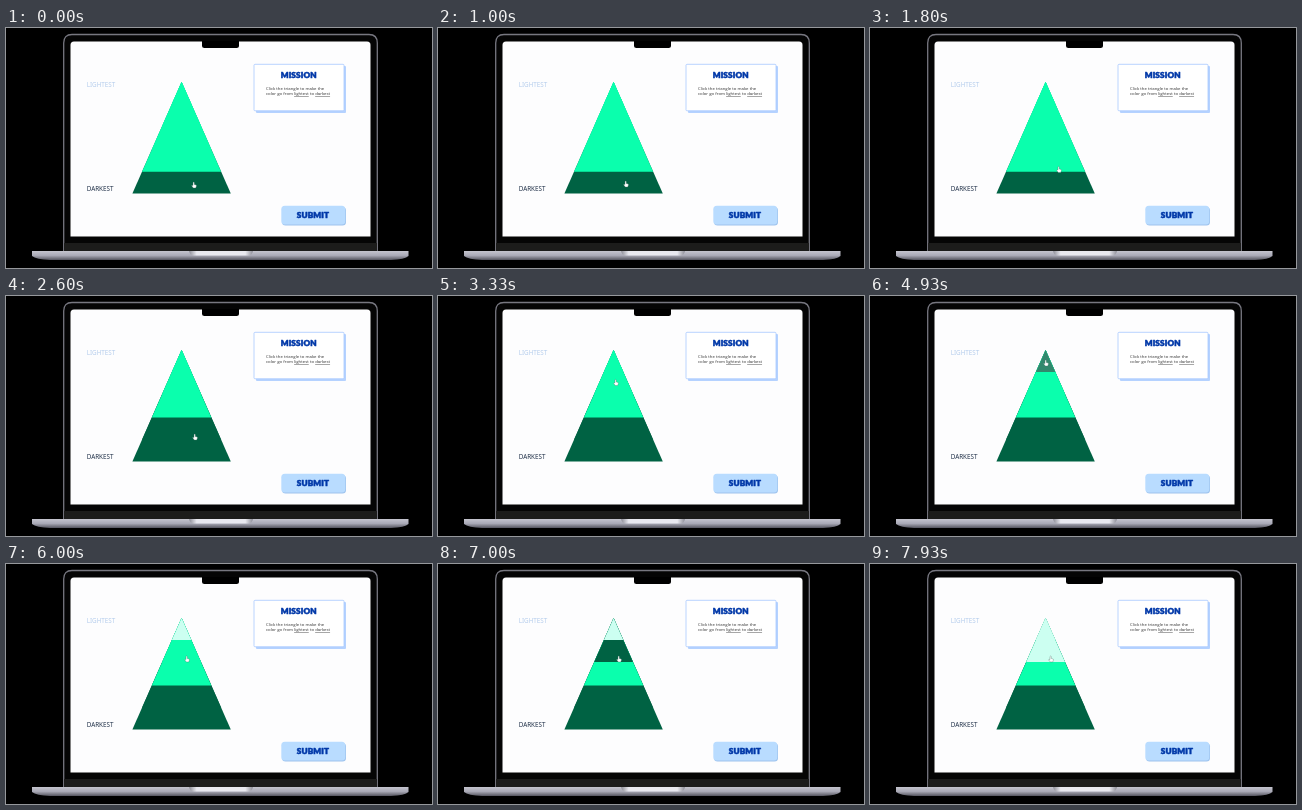
An HTML page that plays this animation: 426 by 240 pixels, repeating every 8000 ms.

```html
<!DOCTYPE html>
<html lang="en">
<head>
<meta charset="utf-8">
<title>Triangle shades</title>
<style>
  html, body { margin: 0; width: 100%; height: 100%; overflow: hidden; background: #000; }
  svg { display: block; width: 100vw; height: 100vh; }
  .heavy { font: 900 8.2px Lato, sans-serif; letter-spacing: .15px; fill: #0038a8; stroke: #0038a8; stroke-width: .55; stroke-linejoin: round; text-anchor: middle; }
  .label { font: 6.3px "Noto Sans", sans-serif; }
  .copy { font: 4.3px "Open Sans", sans-serif; fill: #333; }
  .u { text-decoration: underline; }
</style>
</head>
<body>
<svg viewBox="0 0 426 240">
  <defs>
    <linearGradient id="metal" x2="0" y2="1">
      <stop stop-color="#c4c4ce"/><stop offset=".5" stop-color="#a9a9b6"/><stop offset="1" stop-color="#55555f"/>
    </linearGradient>
    <linearGradient id="lip">
      <stop stop-color="#8c8c96"/><stop offset=".12" stop-color="#e8e8ef"/>
      <stop offset=".88" stop-color="#e8e8ef"/><stop offset="1" stop-color="#8c8c96"/>
    </linearGradient>
  </defs>

  <!-- Laptop -->
  <rect width="426" height="240"/>
  <path d="M57.7 223V15Q57.7 6.5 66 6.5H363Q371.3 6.5 371.3 15V223Z" fill="#050505" stroke="#777780" stroke-width="1.3"/>
  <path d="M64.5 208.5V17Q64.5 13.5 68 13.5H361Q364.5 13.5 364.5 17V208.5Z" fill="#fdfdfe"/>
  <path d="M196 13H233V17.5Q233 20 230.5 20H198.5Q196 20 196 17.5Z"/>
  <rect x="58" y="215" width="313" height="8" fill="#1c1c1b"/>
  <path d="M26 223H402.5V228Q399 231.5 385 232H44Q30 231.5 26 228Z" fill="url(#metal)"/>
  <path d="M183 223H247Q246 227.5 242 227.5H188Q184 227.5 183 223Z" fill="url(#lip)"/>

  <!-- Lesson -->
  <text class="label" x="80.7" y="59.3" fill="#b5cdec">LIGHTEST</text>
  <text class="label" x="80.7" y="163.2" fill="#25354c">DARKEST</text>
  <g id="rows"></g>

  <rect x="250" y="38" width="90" height="47" rx="1" fill="#b5d2ff"/>
  <rect x="248" y="36.3" width="90" height="46.5" rx="1" fill="#fff" stroke="#a9caff" stroke-width=".8"/>
  <text class="heavy" x="292.7" y="50">MISSION</text>
  <text class="copy" x="260" y="61.9">Click the triangle to make the</text>
  <text class="copy" x="260" y="67">color go from <tspan class="u">lightest</tspan> to <tspan class="u">darkest</tspan></text>

  <rect x="276" y="179" width="64" height="18.5" rx="3.5" fill="#9fc4ee"/>
  <rect x="275.3" y="177.8" width="64" height="18.7" rx="3.5" fill="#b9dcff"/>
  <text class="heavy" x="307" y="189.5">SUBMIT</text>

  <path id="hand" d="M-1-2.5Q-.3-3.5.3-2.5V-.5L2.2 0Q2.7.5 2.3 1.5L1.7 3H-.7L-2.4.8Q-2.3-.1-1 .5Z" fill="#fff" stroke="#476b60" stroke-width=".35"/>
</svg>
<script>
const LOOP = 8000;
const GREEN = [10, 255, 173], DARK = [0, 98, 67], PALE = [204, 255, 241];
const APEX = { x: 175.6, y: 54 }, SLOPE = 49.2 / 111.5;
const EDGES = [54, 76, 98, 121.5, 143.7, 165.5];
const FADE = 250;

// Each click starts a fade to the next shade: [time, color].
const shades = [
  [[0, GREEN], [4500, DARK], [4870, PALE]],
  [[0, GREEN], [6600, DARK], [7050, PALE]],
  [[0, GREEN]],
  [[0, GREEN], [2150, DARK]],
  [[0, DARK]]
];
const cursor = [
  [0, 188, 157], [1000, 188, 156], [1400, 188, 156], [1850, 189, 141],
  [2800, 189, 141], [3600, 174, 67], [4200, 174, 67], [4500, 176, 67],
  [5300, 176, 67], [5850, 181, 95], [LOOP, 181, 95]
];

const mix = (a, b, p) => a + (b - a) * p;
const ease = p => p * p * (3 - 2 * p);
const hand = document.getElementById("hand");

// Rows reach down to the base and the upper ones cover the lower, so no seams show.
const rows = shades.map((_, i) => {
  const bottom = EDGES[i + 1], half = (bottom - APEX.y) * SLOPE;
  const row = document.createElementNS("http://www.w3.org/2000/svg", "path");
  row.setAttribute("d", `M${APEX.x} ${APEX.y}L${APEX.x + half} ${bottom}H${APEX.x - half}Z`);
  document.getElementById("rows").prepend(row);
  return row;
});

function shadeAt(steps, time) {
  let color = steps[0][1];
  for (const [start, next] of steps.slice(1)) {
    const p = Math.min(1, Math.max(0, (time - start) / FADE));
    color = color.map((value, i) => mix(value, next[i], p));
  }
  return `rgb(${color.map(Math.round)})`;
}

function cursorAt(time) {
  const i = cursor.findIndex(key => key[0] > time);
  const [t0, x0, y0] = cursor[i - 1], [t1, x1, y1] = cursor[i];
  const p = ease((time - t0) / (t1 - t0));
  return [mix(x0, x1, p), mix(y0, y1, p)];
}

function draw() {
  const time = performance.now() % LOOP;
  rows.forEach((row, i) => row.setAttribute("fill", shadeAt(shades[i], time)));
  hand.setAttribute("transform", `translate(${cursorAt(time)})`);
  requestAnimationFrame(draw);
}
draw();
</script>
</body>
</html>
```
